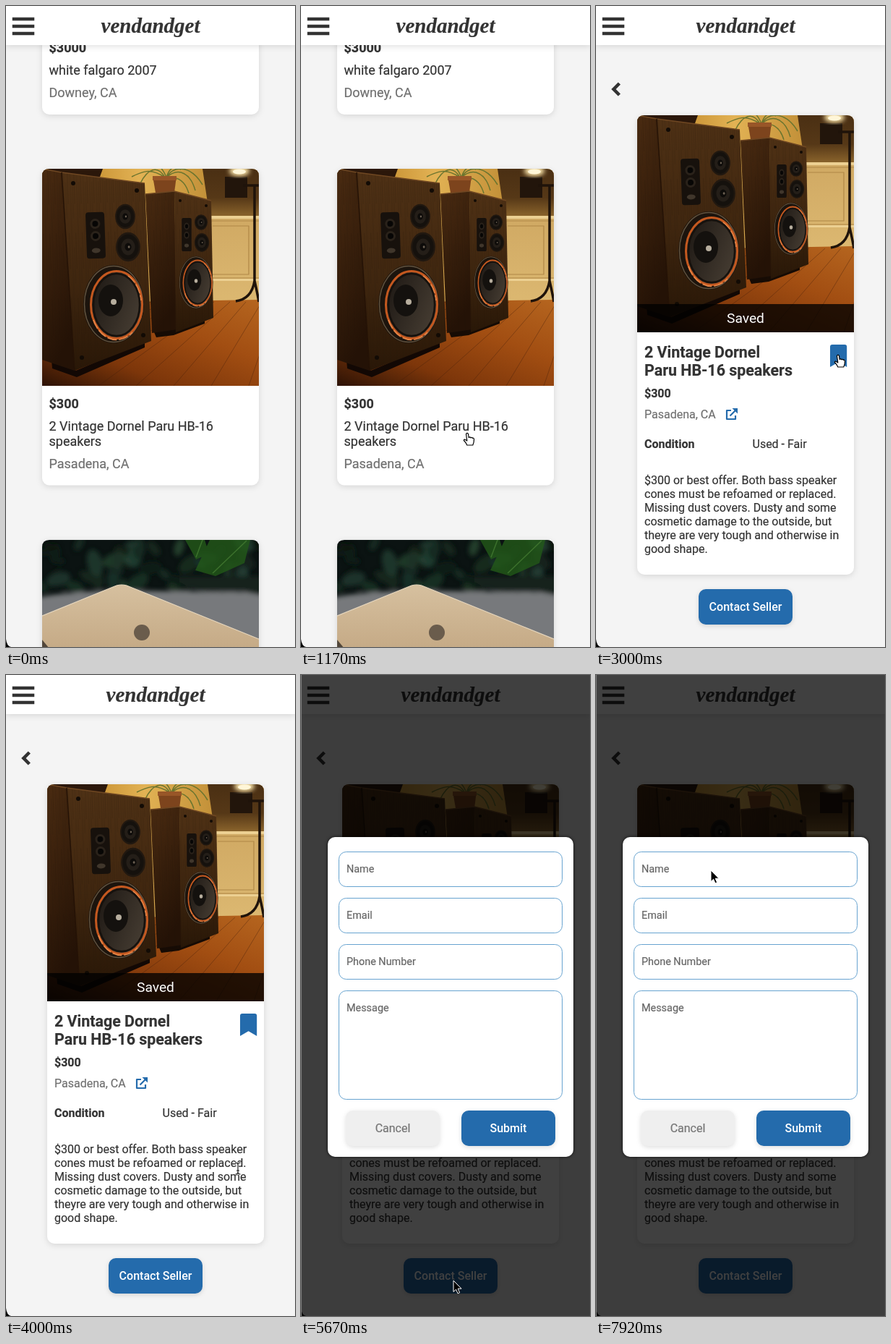
An HTML page for the animation above (8000 ms loop, 400 by 886 pixels).

```html
<!DOCTYPE html>
<html lang="en">
<head>
<meta charset="utf-8">
<title>Marketplace demo</title>
<style>
  html, body { margin: 0; width: 100%; height: 100%; overflow: hidden; background: #f4f4f4; }
  svg { display: block; width: 100vw; height: 100vh; }
  text { font: 18px Roboto, sans-serif; fill: #333; stroke: #333; stroke-width: .2px; }
  .bold { font-weight: 700; }
  .soft { fill: #707070; stroke: #707070; }
  .card { fill: #fff; filter: drop-shadow(0 2px 4px rgba(0,0,0,.12)); }
  .btn { filter: drop-shadow(0 2px 3px rgba(0,0,0,.13)); }
  .logo { font: italic bold 29px "Liberation Serif", serif; text-anchor: middle; }
  .detail text { font-size: 16px; }
  .detail .title { font-size: 21.4px; }
  .detail .toast { font-size: 19.2px; }
  .mid { text-anchor: middle; }
  .modal text { font-size: 14.4px; fill: #666; stroke: #666; }
  .modal .mid { font-size: 16px; }
  .modal .cancel { fill: #757575; stroke: #757575; }
  .detail .white, .modal .white { fill: #fff; stroke: none; }
  .medium, .modal .medium { font-weight: 500; }
  .field { fill: #fff; stroke: #67a3d0; }
</style>
</head>
<body>
<svg viewBox="0 0 400 886" preserveAspectRatio="none">
  <defs>
    <clipPath id="photoClip"><path d="M0 300V10Q0 0 10 0H290Q300 0 300 10V300Z"/></clipPath>
    <filter id="blur" x="-20%" y="-20%" width="140%" height="140%"><feGaussianBlur stdDeviation="3"/></filter>
    <linearGradient id="wall"><stop offset=".28" stop-color="#cf9a3c"/><stop offset=".45" stop-color="#e2b254"/><stop offset=".75" stop-color="#c4923a"/></linearGradient>
    <linearGradient id="nook" x2="0" y2="1"><stop offset="0" stop-color="#4a2f13"/><stop offset=".6" stop-color="#563817"/><stop offset="1" stop-color="#8d662d"/></linearGradient>
    <linearGradient id="panel" x2="0" y2="1"><stop offset="0" stop-color="#d0a963"/><stop offset="1" stop-color="#dcb871"/></linearGradient>
    <linearGradient id="floor" x1="0" y1="1" x2="1" y2="0"><stop offset="0" stop-color="#2c1205"/><stop offset=".3" stop-color="#7d360a"/><stop offset=".65" stop-color="#a24e12"/><stop offset="1" stop-color="#b5651f"/></linearGradient>
    <linearGradient id="wood" x2="0" y2="1"><stop offset="0" stop-color="#4f3115"/><stop offset=".55" stop-color="#3f260f"/><stop offset="1" stop-color="#291707"/></linearGradient>
    <linearGradient id="side" x2=".3" y2="1"><stop offset="0" stop-color="#4a2b11"/><stop offset="1" stop-color="#241206"/></linearGradient>
    <linearGradient id="cone" x2="1" y2=".5"><stop offset="0" stop-color="#1b1612"/><stop offset="1" stop-color="#433a30"/></linearGradient>
    <linearGradient id="lid" x2="0" y2="1"><stop offset="0" stop-color="#d6c09f"/><stop offset="1" stop-color="#c5aa86"/></linearGradient>
    <pattern id="grain" width="9" height="90" patternUnits="userSpaceOnUse" patternTransform="rotate(-2)">
      <path d="M2 0V90M5 20V70M7.500 0V50" stroke="#1c0d03" stroke-width=".8" opacity=".22"/>
    </pattern>
    <g id="unit">
      <circle r="14" fill="#15110d" stroke="#211810" stroke-width="2"/>
      <circle r="8.500" fill="#241e18"/><circle r="4" fill="#0d0b09"/><circle r="1.300" cx="1" fill="#6b6052"/>
    </g>
    <g id="woofer">
      <ellipse rx="42" ry="54" fill="#1c140d"/>
      <ellipse rx="40.500" ry="52.500" fill="none" stroke="#62533f" stroke-width="1.500"/>
      <ellipse cx="4" cy="1" rx="35.500" ry="46.500" fill="url(#cone)" stroke="#c4581f" stroke-width="3"/>
      <path d="M-28 22A35 46 0 0 0 26 39M20 -39A35 46 0 0 1 38 -5" fill="none" stroke="#e58446" stroke-width="1.800" stroke-dasharray="13 3"/>
      <ellipse cx="4" cy="1" rx="32" ry="43" fill="none" stroke="#16110d" stroke-width="2.500"/>
      <ellipse cx="-4" cy="-5" rx="17" ry="22" fill="#14110e"/>
      <circle cy="-3" r="4" fill="#b7ae9e"/>
    </g>
    <g id="plate">
      <rect x="-13" y="-32" width="26" height="64" rx="4" fill="#17110c"/>
      <circle cy="-16" r="7" fill="#2a221a"/><circle cy="1" r="7" fill="#2a221a"/>
      <circle cy="-16" r="4" fill="#070605"/><circle cy="1" r="4" fill="#070605"/>
      <ellipse cy="21" rx="6" ry="3.500" fill="#40362b"/>
    </g>
    <g id="speakers" clip-path="url(#photoClip)">
      <rect width="300" height="300" fill="url(#wall)"/>
      <path d="M0 0H84L80 11H0Z" fill="#2b170a"/>
      <path d="M222 0H300V67H232Z" fill="url(#nook)"/>
      <path d="M253 11h31v29h-31z" fill="#22150b"/>
      <ellipse cx="273" cy="3" rx="14" ry="7" fill="#ffe9ae" filter="url(#blur)"/>
      <ellipse cx="273" cy="4" rx="9" ry="3.500" fill="#fff6d8"/>
      <path d="M232 66H300V186H232Z" fill="url(#panel)"/>
      <path d="M232 65H300V69H232ZM232 152H300V155H232Z" fill="#ecd092"/>
      <path d="M232 72H300M236 79H286V146H236M232 151H300" fill="none" stroke="#b08746" stroke-width="1.200"/>
      <path d="M0 186L300 181V300H0Z" fill="url(#floor)"/>
      <path id="boards" stroke="#45200a" stroke-width="1" opacity=".4" fill="none"/>
      <path d="M170 12C150 -2 138 4 124 11M170 12C160 -6 146 0 136 20M172 12C184 -8 208 -2 222 22M172 12C190 -4 206 8 212 30M172 12Q178 -8 192 1M172 12Q164 -8 156 -1M174 12Q196 10 203 34" fill="none" stroke="#6b752f" stroke-width="1.500"/>
      <path d="M153 10H186L183 33H157Z" fill="#7d441d"/><path d="M153 10h33v6h-33z" fill="#985628"/>
      <path d="M278 23H300M294 23V155M294 155Q290 180 268 183M294 155Q298 172 300 184" fill="none" stroke="#1f130a" stroke-width="3.500"/>
      <path d="M155 226L225 206V214L182 230L158 233Z" fill="#160b04"/>
      <path d="M143 35L183 31L187 222L152 227Z" fill="url(#side)"/>
      <path d="M183 31L234 44L237 206L185 226Z" fill="url(#wood)"/>
      <path d="M143 35L183 31L234 44L237 206L185 226L152 227Z" fill="url(#grain)"/>
      <path d="M143 35L183 31L234 44" fill="none" stroke="#6f4722" stroke-width="1.500"/>
      <circle cx="191" cy="44" r="2" fill="#120b05"/><circle cx="227" cy="51" r="2" fill="#120b05"/>
      <use href="#plate" transform="translate(200 91) scale(.52 .72)"/>
      <use href="#unit" transform="translate(220 74) scale(.6 .72)"/>
      <use href="#unit" transform="translate(221 102) scale(.68 .86)"/>
      <use href="#woofer" transform="translate(213 157) scale(.56 .67)"/>
      <path d="M13 264L47 279L142 238V247L48 288L14 276Z" fill="#120804"/>
      <path d="M0 1L27 5L45 279L0 264Z" fill="url(#side)"/>
      <path d="M27 5L142 20L151 238L45 279Z" fill="url(#wood)"/>
      <path d="M0 1L27 5L142 20L151 238L45 279L0 264Z" fill="url(#grain)"/>
      <path d="M5 1L27 5L142 20" fill="none" stroke="#6f4722" stroke-width="1.600"/>
      <path d="M27 5L45 279" stroke="#241206" stroke-width="1.500"/>
      <circle cx="43" cy="20" r="3" fill="#120b05"/><circle cx="131" cy="30" r="3" fill="#120b05"/>
      <circle cx="55" cy="261" r="3" fill="#120b05"/><circle cx="140" cy="230" r="3" fill="#120b05"/>
      <use href="#plate" transform="translate(74 92) rotate(-2)"/>
      <use href="#unit" transform="translate(115 66) scale(.93 1.15)"/>
      <use href="#unit" transform="translate(119 108) scale(1.130 1.350)"/>
      <use href="#woofer" transform="translate(99 187)"/>
    </g>
    <g id="laptop" clip-path="url(#photoClip)">
      <rect width="300" height="300" fill="#0b1312"/>
      <g filter="url(#blur)">
        <g id="leaves"></g>
        <path d="M-10 80Q60 68 130 70T310 72V170H-10Z" fill="#77797b"/>
        <path d="M190 58Q225 80 262 68L310 78V50H190Z" fill="#14231b"/>
      </g>
      <path d="M198 0H225L231 19L213 27ZM232 0H288L280 32L240 50L212 42Z" fill="#245a1a" opacity=".8"/>
      <path d="M236 46L283 1M213 24L222 0" stroke="#4a8236" stroke-width="1.500" opacity=".7"/>
      <path d="M0 105L103 63Q110 61 117 63L300 137V150H0Z" fill="url(#lid)"/>
      <path d="M0 105L103 63Q110 61 117 63L300 137" fill="none" stroke="#e6d6bd" stroke-width="1.200"/>
      <path d="M0 138L10 150H0Z" fill="#51463a"/>
      <circle cx="138" cy="128" r="11" fill="#6a5c4c"/>
    </g>
    <path id="mark" d="M324 499V471a3 3 0 0 1 3-3h17.200a3 3 0 0 1 3 3v28l-11.600-6.800z"/>
  </defs>

  <rect width="400" height="886" fill="#f4f4f4"/>

  <g id="list">
    <rect class="card" x="50" y="-260" width="300" height="410" rx="10"/>
    <text class="bold" x="59.500" y="64">$3000</text>
    <text x="59.500" y="95">white falgaro 2007</text>
    <text class="soft" x="59.500" y="126">Downey, CA</text>
    <rect class="card" x="50" y="225" width="300" height="437.500" rx="10"/>
    <use href="#speakers" x="50" y="225"/>
    <text class="bold" x="59.500" y="556">$300</text>
    <text x="59.500" y="587">2 Vintage Dornel Paru HB-16</text>
    <text x="59.500" y="608">speakers</text>
    <text class="soft" x="59.500" y="639">Pasadena, CA</text>
    <rect class="card" x="50" y="738" width="300" height="430" rx="10"/>
    <use href="#laptop" x="50" y="738"/>
  </g>

  <g id="detail" class="detail">
    <path d="M32.300 107L24.400 115L32.300 123" fill="none" stroke="#333" stroke-width="4.600"/>
    <rect class="card" x="57" y="151" width="300" height="635" rx="10"/>
    <use href="#speakers" x="57" y="151"/>
    <g id="toast">
      <rect x="57" y="412" width="300" height="39" opacity=".78"/>
      <text class="toast mid white" x="207" y="438">Saved</text>
    </g>
    <text class="title bold" x="67" y="486">2 Vintage Dornel</text>
    <text class="title bold" x="67" y="511">Paru HB-16 speakers</text>
    <use id="saved" href="#mark" fill="#246bac"/>
    <path id="unsaved" d="M325.500 496.400V469.500H345.700V496.400L335.600 490.500Z" fill="none" stroke="#246bac" stroke-width="3" stroke-linejoin="round"/>
    <text class="bold" x="67" y="541">$300</text>
    <text class="soft" x="67" y="570">Pasadena, CA</text>
    <path d="M187 559H181V571H193V566M185.500 566.500L193 559" fill="none" stroke="#246bac" stroke-width="2.200" stroke-linejoin="round"/>
    <path d="M188.500 556H196V563.500Z" fill="#246bac"/>
    <text class="bold" x="67" y="611">Condition</text>
    <text x="216.500" y="611">Used - Fair</text>
    <g id="about"></g>
    <rect id="contact" class="btn" x="142" y="806" width="130" height="49" rx="10"/>
    <text class="mid white medium" x="207" y="836">Contact Seller</text>
  </g>

  <rect width="400" height="54" class="card"/>
  <path d="M11 18H37M11 28H37M11 38H37" stroke="#333" stroke-width="4.500" stroke-linecap="square"/>
  <text id="logo" class="logo" y="37">vendandget</text>
  <path d="M0 875Q1 885 7 886H0Z"/>

  <g id="modal" class="modal">
    <rect width="400" height="886" opacity=".75"/>
    <rect width="1" height="886" fill="#777"/>
    <rect x="37" y="224" width="340" height="442" rx="10" fill="#fff" style="filter:drop-shadow(0 0 2px rgba(0,0,0,.8))"/>
    <g id="fields"></g>
    <rect class="btn" x="62" y="602" width="130" height="49" rx="10" fill="#efefef"/>
    <text class="mid cancel" x="127" y="632">Cancel</text>
    <rect class="btn" x="222" y="602" width="130" height="49" rx="10" fill="#246bac"/>
    <text class="mid white medium" x="287" y="632">Submit</text>
  </g>

  <g id="cursor">
    <path id="arrow" d="M0 0V15.500L3.600 12.200L6 17.800L8.600 16.700L6.200 11.200H11Z" fill="#000" stroke="#fff"/>
    <path id="hand" d="M-1.500 1.500Q0 -.6 1.500 1.500L2.200 6.500Q3.800 5 5 6.800Q6.500 5.600 7.500 7.400Q9.300 6.600 9.500 9Q9.600 13 7.800 17H-.2Q-1.500 13.500-4.600 10.500Q-4.500 8-1.700 10L-.2 11Z" fill="#fff" stroke="#000" stroke-width="1.200" stroke-linejoin="round"/>
    <g id="beam" fill="none">
      <path id="bar" d="M-3.500 -8Q0 -8 0 -5Q0 -8 3.500 -8M0 -6V6M-3.500 8Q0 8 0 5Q0 8 3.500 8M-2 3H2" stroke="#fff" stroke-width="2.500"/>
      <path d="M-3.500 -8Q0 -8 0 -5Q0 -8 3.500 -8M0 -6V6M-3.500 8Q0 8 0 5Q0 8 3.500 8M-2 3H2" stroke="#111" stroke-width="1.100"/>
    </g>
  </g>
</svg>

<script>
const $ = id => document.getElementById(id);
const LOOP = 8000, STEP = 1000 / 12;
const OPEN = 1750, SAVE = 2917, TOAST_END = 4750, MODAL = 5417;

// Cursor stops: time, x, y
const stops = [
  [480, 300, 892], [1000, 230, 590], [1750, 230, 590], [2000, 305, 554],
  [2450, 335, 482], [3580, 335, 482], [4000, 321, 682], [4600, 213, 839],
  [5400, 213, 839], [5500, 211, 837], [5830, 211, 837], [6250, 159, 270], [LOOP, 159, 270]
];

const about = [
  '$300 or best offer. Both bass speaker', 'cones must be refoamed or replaced.',
  'Missing dust covers. Dusty and some', 'cosmetic damage to the outside, but',
  'theyre are very tough and otherwise in'.replace('are ', ''), 'good shape.'
];
about[4] = 'theyre are very tough and otherwise in';

function build() {
  $('about').innerHTML = about.map((s, i) => `<text x="67" y="${661 + i * 19}">${s}</text>`).join('');
  $('fields').innerHTML = ['Name', 'Email', 'Phone Number', 'Message'].map((s, i) => {
    const y = 244.5 + i * 64;
    return `<rect class="field" x="52.5" y="${y}" width="309" height="${i < 3 ? 48 : 150}" rx="10"/>
      <text x="63" y="${y + 28.5}">${s}</text>`;
  }).join('');

  let boards = '';
  for (let i = 0; i < 11; i++) boards += `M${150 + i * 22} 184L${i * 52 - 130} 300`;
  $('boards').setAttribute('d', boards);

  let seed = 7, leaves = '';
  const rnd = () => (seed = seed * 16807 % 2147483647) / 2147483647;
  for (let i = 0; i < 45; i++) {
    const x = rnd() * 300, y = rnd() * 70, r = 7 + rnd() * 12;
    leaves += `<ellipse cx="${x}" cy="${y}" rx="${r}" ry="${r * .55}" transform="rotate(${rnd() * 180} ${x} ${y})"
      fill="hsl(${140 + rnd() * 20},30%,${6 + rnd() * 13}%)"/>`;
  }
  $('leaves').innerHTML = leaves;
}

function cursorAt(t) {
  const i = Math.max(1, stops.findIndex(s => s[0] >= t));
  const [a, ax, ay] = stops[i - 1], [b, bx, by] = stops[i];
  const p = Math.min(1, Math.max(0, (t - a) / (b - a)));
  const e = p * p * (3 - 2 * p);
  return [ax + (bx - ax) * e, ay + (by - ay) * e];
}

const inside = (x, y, l, t, r, b) => x >= l && x <= r && y >= t && y <= b;

function cursorKind(t, x, y) {
  if (t >= MODAL) return 'arrow';
  if (t < OPEN) return inside(x, y, 50, 225, 350, 662) || inside(x, y, 50, 738, 350, 886) ? 'hand' : 'arrow';
  if (inside(x, y, 324, 468, 348, 499) || inside(x, y, 142, 806, 272, 855)) return 'hand';
  return inside(x, y, 67, 646, 347, 760) ? 'beam' : 'arrow';
}

const show = (id, on) => $(id).setAttribute('display', on ? 'inline' : 'none');

function draw(ms) {
  const t = Math.floor((ms % LOOP + 5) / STEP) * STEP + 1;
  const open = t >= OPEN, saved = t >= SAVE;
  const [x, y] = cursorAt(t), kind = cursorKind(t, x, y);
  show('list', !open);
  show('detail', open);
  show('saved', saved);
  show('unsaved', !saved);
  show('toast', saved && t < TOAST_END);
  show('modal', t >= MODAL);
  show('cursor', t >= stops[0][0]);
  for (const k of ['arrow', 'hand', 'beam']) show(k, k === kind);
  $('logo').setAttribute('x', open ? 207 : 200);
  $('contact').setAttribute('fill', kind === 'hand' && y > 800 ? '#1e5a91' : '#246bac');
  $('cursor').setAttribute('transform', `translate(${x.toFixed(1)} ${y.toFixed(1)})`);
}

build();
const start = performance.now();
function tick() {
  draw(performance.now() - start);
  requestAnimationFrame(tick);
}
tick();
</script>
</body>
</html>
```
